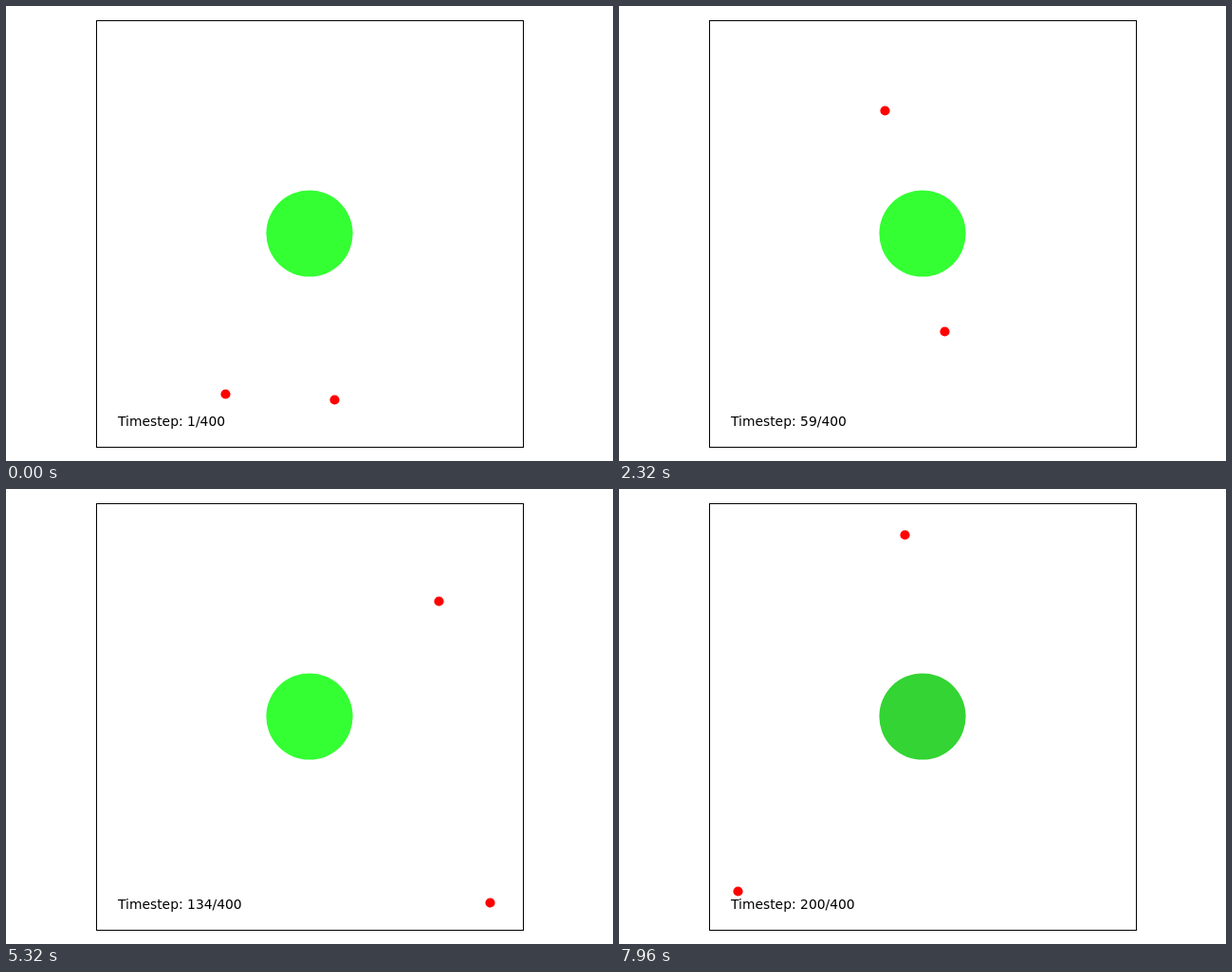
These frames come from a looping animation (640 px wide and 480 px high, 8000 ms). An HTML page:

```html
<!DOCTYPE html>
<html lang="en">
<head>
<meta charset="utf-8">
<title>Two dots around a disc</title>
<style>
  html, body { margin: 0; width: 100%; height: 100%; overflow: hidden; background: #fff; }
  svg { display: block; width: 640px; height: 480px; }
  text { font: 13.89px "DejaVu Sans", sans-serif; }
</style>
</head>
<body>
<svg viewBox="0 0 640 480">
  <clipPath id="box"><rect x="95.5" y="15.5" width="450" height="450"/></clipPath>
  <circle id="disc" cx="320" cy="240" r="45.6"/>
  <g clip-path="url(#box)" fill="#f00">
    <circle id="rightDot" r="5.1"/>
    <circle id="leftDot" r="5.1"/>
  </g>
  <rect x="95.5" y="15.5" width="450" height="450" fill="none" stroke="#000"/>
  <text id="label" x="118" y="443"></text>
</svg>
<script>
const STEP_MS = 40, STEPS = 200, SPEED = 9, SIZE = 450, LEFT = 95, TOP = 15;
const $ = id => document.getElementById(id);

const clamp = (v, lo, hi) => Math.min(hi, Math.max(lo, v));

// Steady shift that builds up to `amount` between two steps and then stays.
const shift = (n, from, to, amount) => amount * clamp((n - from) / (to - from), 0, 1);

// Full reversal of a dot's direction between two steps.
const reverse = (n, from, to) => shift(n, from, to, 2 * SPEED * (to - from));

// Both dots climb diagonally through the wrapping box and turn aside at times.
const rightDot = n => ({
  x: 231 + SPEED * n
    + shift(n, 21, 29, -23) + shift(n, 63, 85, -31) - reverse(n, 85, 133)
    + shift(n, 164, 176, -172.5) - reverse(n, 189, 199),
  y: 409 - SPEED * n
    + shift(n, 9, 21, 223) + shift(n, 63, 85, 28.5)
    + shift(n, 104, 126, 73) + shift(n, 161, 176, 205.5)
});

const leftDot = n => ({
  x: 346 - SPEED * n
    + shift(n, 36, 40, 69) + shift(n, 83, 95, 201)
    + shift(n, 108, 133, 137) + shift(n, 133, 147, 9.5) + shift(n, 181, 195, 253.5),
  y: 415 - SPEED * n
});

const wrap = (v, start) => start + ((v - start) % SIZE + SIZE) % SIZE;
const snap = v => Math.floor(v) + 0.5;

function place(id, { x, y }) {
  $(id).setAttribute("cx", snap(wrap(x, LEFT)));
  $(id).setAttribute("cy", snap(wrap(y, TOP)));
}

function draw(time) {
  const n = Math.floor(time / STEP_MS) % STEPS;
  place("rightDot", rightDot(n));
  place("leftDot", leftDot(n));
  // The disc dims while a dot is inside it.
  const green = Math.round(255 * 0.987 ** clamp(n - 168, 0, 14));
  $("disc").setAttribute("fill", `rgb(51,${green},51)`);
  $("label").textContent = `Timestep: ${n + 1}/400`;
}

const start = performance.now();
function tick() {
  draw(performance.now() - start);
  requestAnimationFrame(tick);
}
tick();
</script>
</body>
</html>
```
